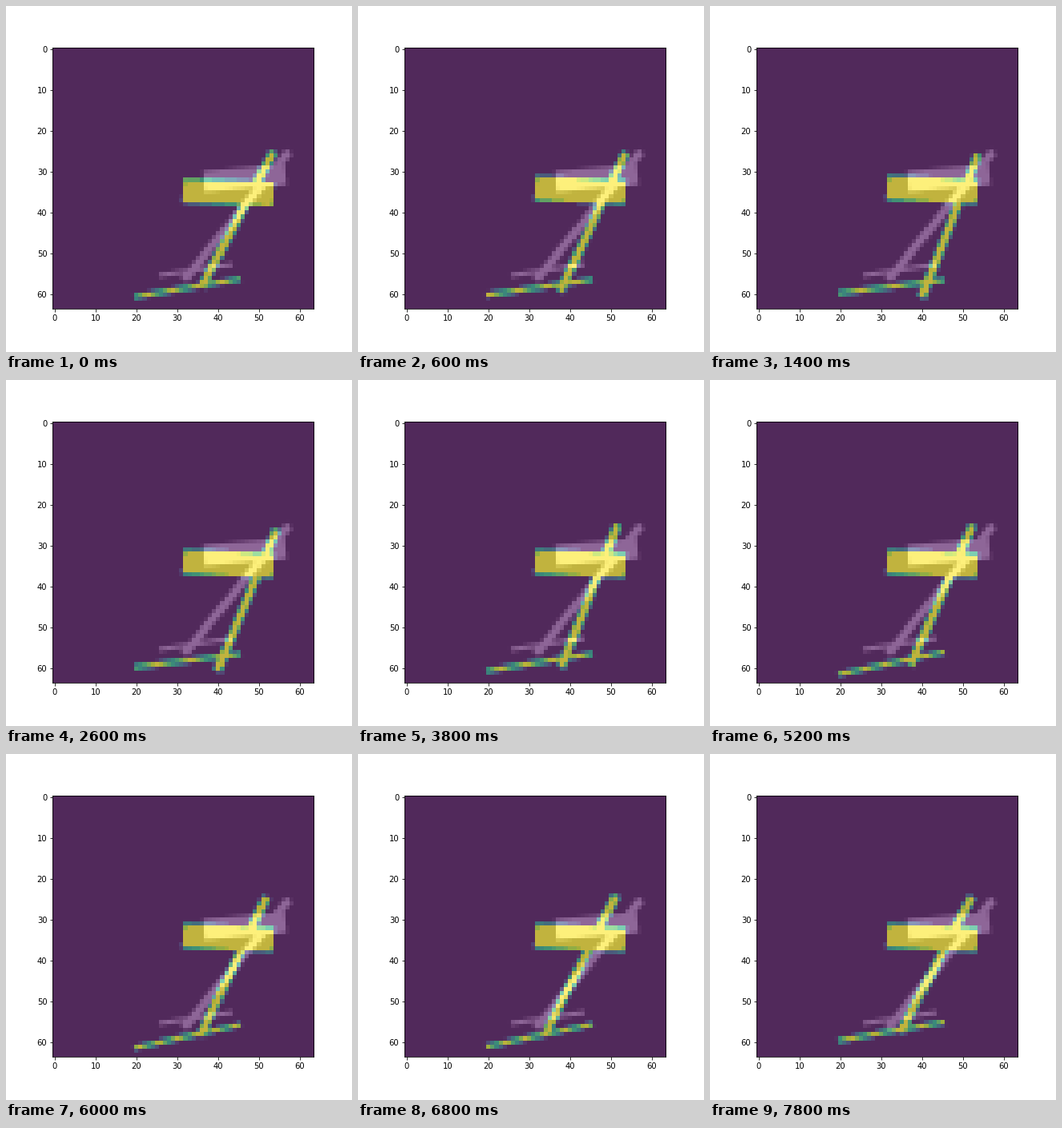
Animation of 432x432 px, one loop 8000 ms. Source, as a matplotlib script:

```python
import numpy as np
import matplotlib.pyplot as plt
from matplotlib.animation import FuncAnimation

N = 64          # image cells per side
SUB = 8         # samples per cell side
FRAMES = 40
STEP_MS = 200
HIP_Y = 35
POLE = 37.6     # pole length in cells

axis = (np.arange(N * SUB) + 0.5) / SUB
X, Y = np.meshgrid(axis, axis)

# Key poses: time step, pole's x at hip height, lean in degrees, height of ski
POSES = np.array([
    (0, 49.0, 27.9, 58.9),
    (7, 50.7, 21.5, 58.6),
    (13, 51.2, 22.7, 58.6),
    (19, 48.3, 21.5, 59.0),
    (26, 48.6, 23.8, 59.2),
    (34, 46.4, 27.1, 58.8),
    (39, 47.3, 27.7, 57.8),
])


def rod(x0, y0, x1, y1, width):
    """Straight bar with square ends."""
    dx, dy = x1 - x0, y1 - y0
    length = np.hypot(dx, dy)
    along = ((X - x0) * dx + (Y - y0) * dy) / length
    across = ((X - x0) * dy - (Y - y0) * dx) / length
    return (along >= 0) & (along <= length) & (abs(across) <= width / 2)


def render(body, pole, ski):
    """Share of each cell covered by the three bars."""
    mask = rod(*body, 6) | rod(*pole, 2) | rod(*ski, 1.1)
    return mask.reshape(N, SUB, N, SUB).mean(axis=(1, 3))


def goal():
    mask = (rod(37, 32.9, 57, 31.2, 5)
            | rod(57.9, 25.5, 32.2, 57.0, 2)
            | rod(26, 55.9, 44, 53.1, 1))
    return mask.reshape(N, SUB, N, SUB).mean(axis=(1, 3))


def current(i):
    hip, lean, ski_y = (np.interp(i, POSES[:, 0], col) for col in POSES.T[1:])

    # The foot reaches lower as the pole stands upright and moves right.
    a = np.radians(lean)
    foot_y = 59.6 + 0.4 * (hip - 48.8) - 0.28 * (lean - 24.6)
    foot_x = hip - (foot_y - HIP_Y) * np.tan(a)
    pole = (foot_x + POLE * np.sin(a), foot_y - POLE * np.cos(a),
            foot_x, foot_y)

    # The ski rocks once per loop; the body settles upwards at the start.
    rise = 4.3 - 1.3 * np.sin(2 * np.pi * i / FRAMES)
    ski = (20, ski_y + rise / 2, 46, ski_y - rise / 2)
    sag = 0.65 * np.exp(-i / 2)
    body = (32, 34.5 + sag, 54, 35.4 + sag)
    return render(body, pole, ski)


fig, ax = plt.subplots(figsize=(6, 6), dpi=72)
fig.subplots_adjust(left=0.125, right=0.9, bottom=0.125, top=0.88)
view = ax.imshow(current(0), cmap="viridis", vmin=0, vmax=1,
                 interpolation="nearest")
ax.imshow(103 + 152 * goal(), cmap="gray", vmin=0, vmax=255,
          alpha=0.4, interpolation="nearest")


def update(i):
    view.set_data(current(i))
    return (view,)


anim = FuncAnimation(fig, update, frames=FRAMES, interval=STEP_MS,
                     repeat=True, repeat_delay=0)
plt.show()
```
